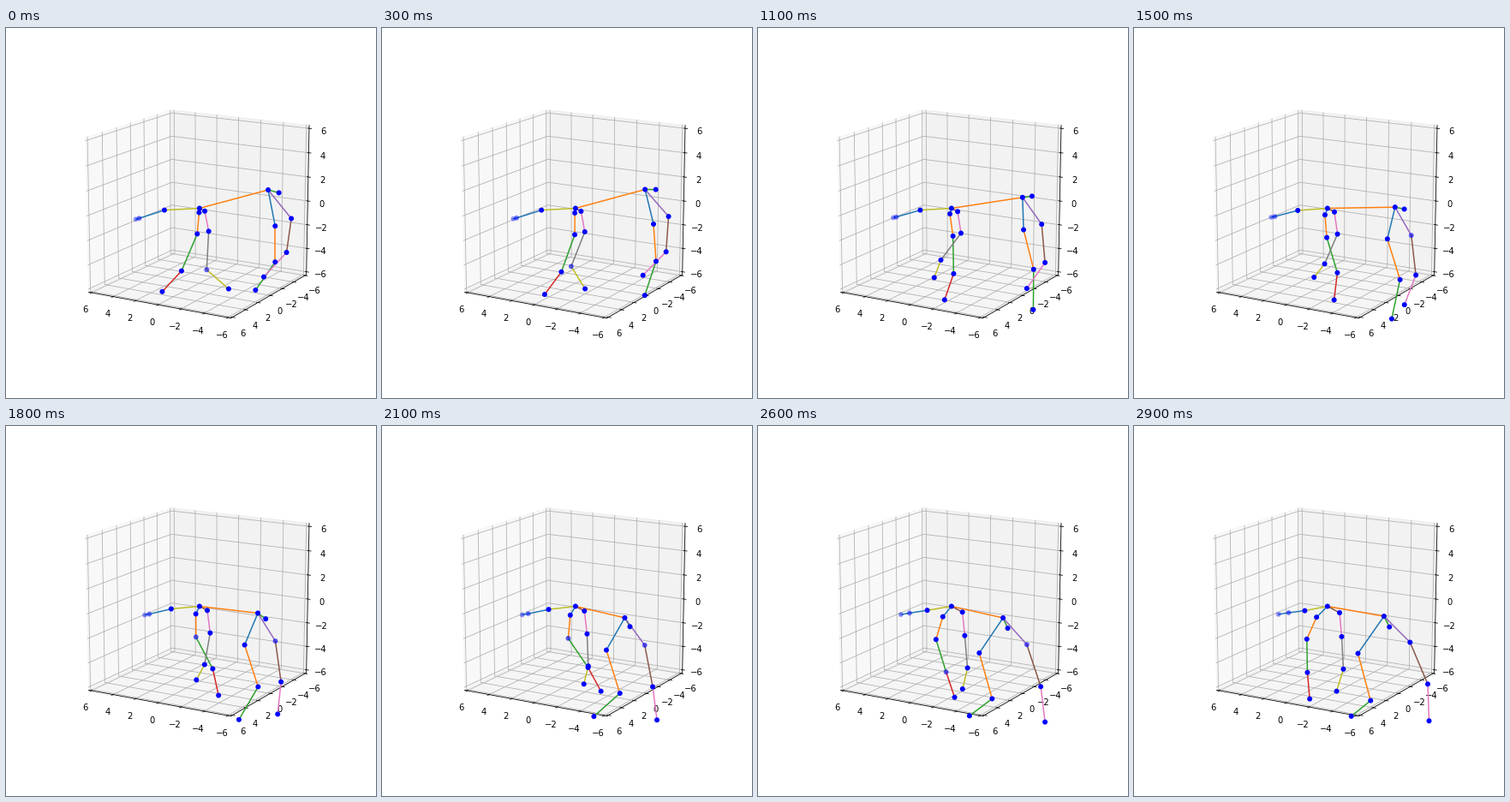
Animation, 432 px wide and 432 px high, one loop 3 s. Source, as a matplotlib script:

```python
import numpy as np
import matplotlib.pyplot as plt
from matplotlib.animation import FuncAnimation

SIZE, DPI, FRAMES = 432, 72, 30
LIM, EDGE, LABEL = 6, 6.25, 7.085

plt.rcParams["font.family"] = "DejaVu Sans"
fig = plt.figure(figsize=(SIZE / DPI, SIZE / DPI), dpi=DPI, facecolor="white")
ax = fig.add_axes([0, 0, 1, 1])
ax.set_xlim(0, SIZE)
ax.set_ylim(SIZE, 0)
ax.axis("off")

# Perspective camera around the cube of data
az, el = np.radians(120), np.radians(15)
RIGHT = np.array([-np.sin(az), np.cos(az), 0])
UP = np.array([-np.sin(el) * np.cos(az), -np.sin(el) * np.sin(az), np.cos(el)])
EYE = np.array([np.cos(el) * np.cos(az), np.cos(el) * np.sin(az), np.sin(el)])


def project(*points):
    p = np.array(points, float) / (2 * LIM)
    depth = 10 - p @ EYE
    return np.column_stack([225.9 + 1809.7 * (p @ RIGHT) / depth,
                            210.5 - 1763 * (p @ UP) / depth])


def stroke(points, color):
    ax.plot(*project(*points).T, color=color, lw=0.8, zorder=1)


def pane(points, gray):
    shade = (gray, gray, gray, 0.5)
    ax.fill(*project(*points).T, facecolor=shade, edgecolor=shade, lw=1,
            zorder=0)


def label(point, value):
    x, y = project(point)[0]
    ax.text(x, y, str(value).replace("-", "\u2212"), size=10,
            ha="center", va="top", zorder=2)


def draw_box():
    e, grid = EDGE, "#b0b0b0"
    pane([(e, -e, -e), (e, e, -e), (e, e, e), (e, -e, e)], 0.95)
    pane([(-e, -e, -e), (e, -e, -e), (e, -e, e), (-e, -e, e)], 0.90)
    pane([(-e, -e, -e), (e, -e, -e), (e, e, -e), (-e, e, -e)], 0.925)
    ticks = range(-LIM, LIM + 1, 2)
    for t in ticks:
        stroke([(t, e, -e), (t, -e, -e), (t, -e, e)], grid)
        stroke([(-e, t, -e), (e, t, -e), (e, t, e)], grid)
        stroke([(-e, -e, t), (e, -e, t), (e, e, t)], grid)
    stroke([(e, e, -e), (-e, e, -e)], "black")
    stroke([(-e, e, -e), (-e, -e, -e)], "black")
    stroke([(-e, -e, -e), (-e, -e, e)], "black")
    outer, inner = e + 0.2, e - 0.1
    for t in ticks:
        stroke([(t, outer, -e), (t, inner, -e)], "black")
        stroke([(-outer, t, -e), (-inner, t, -e)], "black")
        stroke([(-outer, -e, t), (-inner, -e, t)], "black")
        label((t, LABEL, -LABEL), t)
        label((-LABEL, t, -LABEL), t)
        label((-LABEL, -LABEL, t), t)


def glide(*values):
    """Smooth curve through values spread evenly over the loop."""
    frames = np.arange(FRAMES)
    if len(values) == 1:
        return np.full(FRAMES, float(values[0]))
    v = np.array(values, float)
    slope = np.gradient(v)
    pos = frames * (len(v) - 1) / (FRAMES - 1)
    i = np.minimum(pos.astype(int), len(v) - 2)
    u = pos - i
    return ((1 + 2 * u) * (1 - u) ** 2 * v[i]
            + u * (1 - u) ** 2 * slope[i]
            + u ** 2 * (3 - 2 * u) * v[i + 1]
            + u ** 2 * (u - 1) * slope[i + 1])


joints = {"chest": np.tile(project((0, 0, 0)), (FRAMES, 1))}
bones = []


def bone(parent, name, color, length, *angles):
    """Hang a bone on a joint; angles are degrees from straight down."""
    turn = np.radians(glide(*angles))
    reach = glide(*length)
    joints[name] = joints[parent] + np.column_stack(
        [reach * np.sin(turn), reach * np.cos(turn)])
    line, = ax.plot([], [], color=color, lw=1.5, zorder=3)
    bones.append((line, parent, name))


draw_box()

# Lengths change as the limbs turn towards or away from the viewer
bone("chest", "neck", "C8", (41, 35, 27), -87, -86, -79)
bone("neck", "jaw", "C0", (31, 28, 19), -72, -75, -83)
bone("jaw", "nose", "C0", (4, 4, 12), -75, -81)
bone("chest", "hip", "C1", (83, 85, 80, 58, 67), 105, 104, 92, 76, 80)
bone("hip", "tail", "C2", (13, 11, 14), 75, 104, 81, 27, 27)

# Front legs
bone("chest", "shoulder_a", "C0", (5, 8, 18), -5, -20, -45)
bone("shoulder_a", "elbow_a", "C1", (25, 28), -5, 8, -2, -24)
bone("elbow_a", "wrist_a", "C2", (47, 39), -23, -13, 15, 34, 1)
bone("wrist_a", "paw_a", "C3", (33, 31), -43, -27, -9, 30, 5)

bone("chest", "shoulder_b", "C5", (7, 9, 16), 62)
bone("shoulder_b", "elbow_b", "C6", (24, 28), 11, 5)
bone("elbow_b", "wrist_b", "C7", (45, 38, 38), -3, -41, -25, 4, 3)
bone("wrist_b", "paw_b", "C8", (34, 20, 27), 49, 7, -38, -12, -17)

# Hind legs
bone("hip", "knee_a", "C0", (43, 38, 53), 11, 14, -12, -31, -35)
bone("knee_a", "heel_a", "C1", (42, 57), 0, 17, 15)
bone("heel_a", "toe_a", "C2", (40, 47, 29), -35, 0, -10, -51, -51)

bone("hip", "knee_b", "C4", (43, 38, 43), 39, 42, 30, 37, 45)
bone("knee_b", "heel_b", "C5", (40, 53), -8, 4, 9, 23)
bone("heel_b", "toe_b", "C6", (39, 37, 43), -43, -44, -23, 9, 2)

# Joints on the far side fade: name -> (first frame, last frame, alpha)
faded = {
    "jaw": (0, 29, 0.4),
    "nose": (0, 29, 0.3),
    "wrist_b": (0, 8, 0.51),
    "knee_b": (13, 27, 0.51),
    "elbow_a": (18, 23, 0.51),
    "wrist_a": (24, 27, 0.51),
}

dots = ax.scatter(np.zeros(len(joints)), np.zeros(len(joints)), s=20, c="b",
                  linewidths=1.5, zorder=4)


def shade(name, frame):
    first, last, alpha = faded.get(name, (0, -1, 1))
    return (0, 0, 1, alpha if first <= frame <= last else 1)


def update(frame):
    for line, parent, name in bones:
        ends = np.array([joints[parent][frame], joints[name][frame]])
        line.set_data(ends[:, 0], ends[:, 1])
    dots.set_offsets([path[frame] for path in joints.values()])
    colors = [shade(name, frame) for name in joints]
    dots.set_facecolor(colors)
    dots.set_edgecolor(colors)
    return [line for line, _, _ in bones] + [dots]


anim = FuncAnimation(fig, update, frames=FRAMES, interval=100, repeat=True)
plt.show()
```
